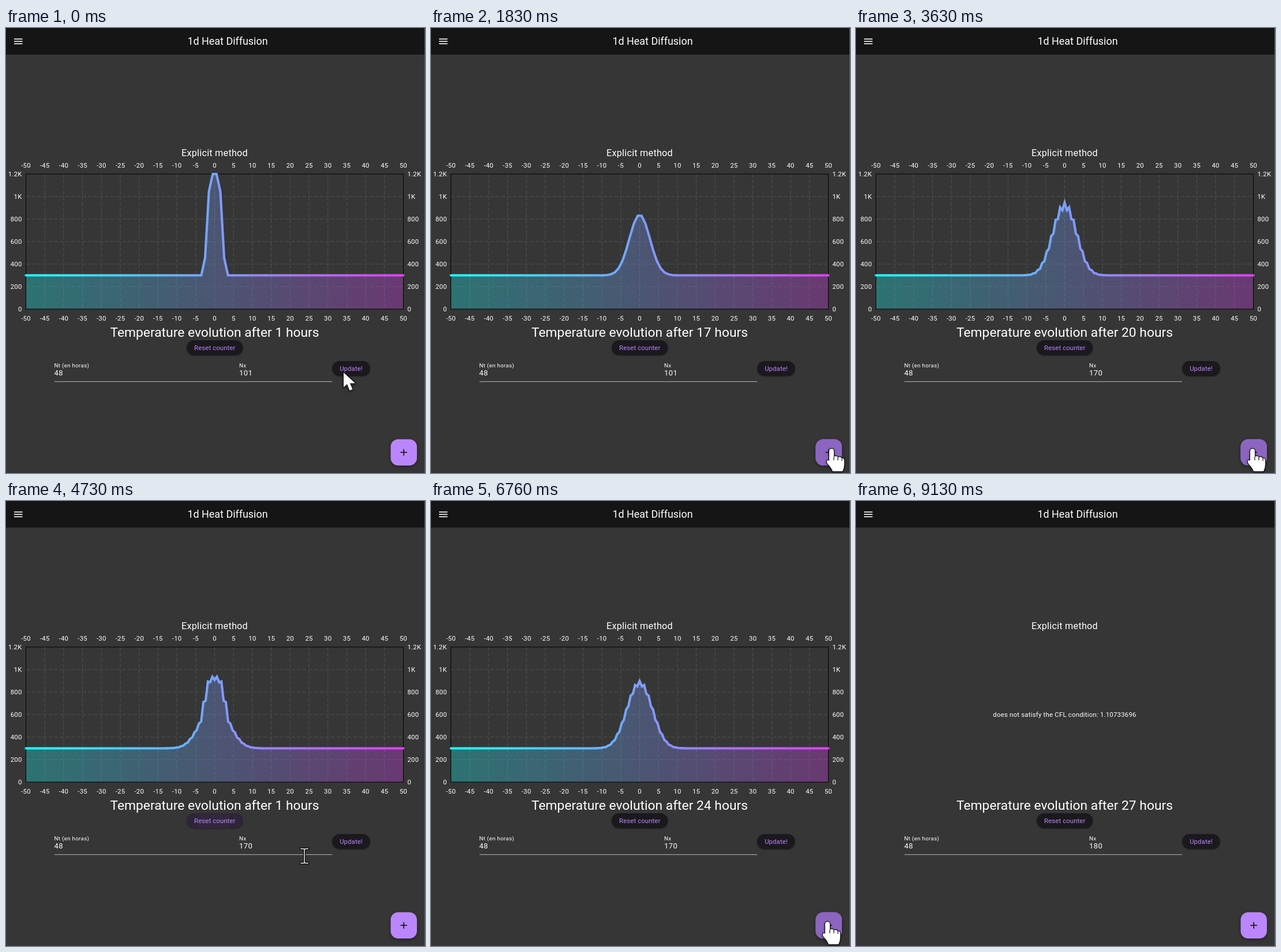
Animation, 726 px wide and 771 px high, one loop 9.46 s. Source, as an HTML page with a canvas:

```html
<!DOCTYPE html>
<html lang="en">
<head>
<meta charset="utf-8">
<title>1d Heat Diffusion</title>
<style>
  html, body { margin: 0; width: 100%; height: 100%; overflow: hidden; background: #363636; }
  canvas { display: block; }
</style>
</head>
<body>
<canvas id="stage" width="726" height="771"></canvas>
<script>
const ctx = document.getElementById('stage').getContext('2d');
const LOOP = 9460, CLICK_GAP = 77, CHART_ANIM = 75, FAIL_TIME = 8530;
const SCALE = 0.815; // page zoom, applied to font sizes
const PURPLE = '#bb86fc';
const plot = { left: 34.5, right: 688.5, top: 253, bottom: 487 };
const px = x => plot.left + (x + 50) * (plot.right - plot.left) / 100;
const py = v => plot.bottom - v * (plot.bottom - plot.top) / 1200;

// Explicit finite differences: hours -> list of [x, temperature]
const cache = {};
function solve(nx, hours) {
  const key = nx + ':' + hours;
  if (cache[key]) return cache[key];
  const count = nx - 1, lambda = 0.1728 * (count / 100) ** 2;
  if (!hours) {
    return cache[key] = Array.from({ length: count }, (_, i) => {
      const x = -50 + 100 * i / (count - 1);
      return [x, Math.abs(x) < 2.5 ? 1200 : 300];
    });
  }
  const u = solve(nx, hours - 1);
  return cache[key] = u.map(([x, v], i) =>
    [x, u[i - 1] && u[i + 1] ? v + lambda * (u[i - 1][1] - 2 * v + u[i + 1][1]) : v]);
}

// Counter states over time
const states = [{ time: -1000, hours: 1, nx: 101 }];
function addClicks(start, from, to, nx) {
  for (let h = from; h <= to; h++) states.push({ time: start + (h - from) * CLICK_GAP, hours: h, nx });
}
addClicks(623, 2, 20, 101);
addClicks(3280, 20, 20, 170);
addClicks(3905, 21, 29, 170);
addClicks(4713, 1, 1, 170);
addClicks(5001, 2, 27, 170);

const typed = [[0, '101'], [2500, '10'], [2530, '1'], [2730, '17'], [2760, '170'],
  [7430, '17'], [7500, '1'], [7630, '180']];

// Pointer path: time, x, y
const path = [[0, 585, 597], [360, 585, 597], [560, 694, 729], [2100, 694, 729],
  [2260, 478, 597], [3000, 478, 597], [3130, 592, 594], [3330, 592, 594],
  [3560, 687, 729], [4530, 687, 729], [4640, 362, 555], [4685, 362, 555],
  [4730, 517, 615], [4860, 687, 729], [6950, 687, 729], [7060, 470, 607],
  [7859, 470, 607], [7860, 617, 566], [8100, 592, 592], [8560, 592, 592], [9110, 500, 10]];

const resetBox = [313, 541, 97.5, 26], updateBox = [565, 577, 66, 26];
const fabBox = [666.5, 712.5, 45.5, 45.5], fieldBox = [84, 575, 481, 42];
const inside = (p, [x, y, w, h]) => p.x >= x && p.x <= x + w && p.y >= y && p.y <= y + h;
const lerp = (a, b, k) => a + (b - a) * k;
const between = (t, a, b) => t >= a && t < b;

function pointerAt(t) {
  const i = path.findIndex(p => p[0] > t);
  if (i < 0) return null;
  const [a, b] = [path[i - 1], path[i]];
  let k = (t - a[0]) / (b[0] - a[0]);
  k = k * k * (3 - 2 * k);
  const p = { x: lerp(a[1], b[1], k), y: lerp(a[2], b[2], k) };
  const onButton = [resetBox, updateBox, fabBox].some(box => inside(p, box));
  p.kind = onButton && t >= 30 ? 'hand' : inside(p, fieldBox) && t >= 30 ? 'beam' : 'arrow';
  return p;
}

function text(str, x, y, size, { align = 'center', color = '#fff', spacing = 0 } = {}) {
  ctx.font = `${size * SCALE}px Roboto, sans-serif`;
  ctx.letterSpacing = spacing * SCALE + 'px';
  ctx.textAlign = align;
  ctx.fillStyle = color;
  ctx.fillText(str, x, y);
}

function rect(color, x, y, w, h) {
  ctx.fillStyle = color;
  ctx.fillRect(x, y, w, h);
}

function rounded([x, y, w, h], radius, color, blur, offset) {
  ctx.save();
  ctx.shadowColor = 'rgba(0,0,0,.38)';
  ctx.shadowBlur = blur;
  ctx.shadowOffsetY = offset;
  ctx.beginPath();
  ctx.roundRect(x, y, w, h, radius);
  ctx.fillStyle = color;
  ctx.fill();
  ctx.restore();
}

function button(box, label, hovered, pressed) {
  rounded(box, 13, pressed ? '#2e2538' : hovered ? '#28222f' : '#1b191d', 2, 1);
  const [x, y, w, h] = box;
  if (pressed) rect('#33273f', x + 20, y + 1, w - 43, h - 2);
  text(label, x + w / 2, y + 17, 14, { color: PURPLE, spacing: 0.1 });
}

function drawAxes() {
  ctx.strokeStyle = '#4d5355';
  ctx.lineWidth = 1;
  ctx.setLineDash([8 * SCALE, 4 * SCALE]);
  ctx.beginPath();
  for (let x = -45; x < 50; x += 5) {
    ctx.moveTo(px(x), plot.top);
    ctx.lineTo(px(x), plot.bottom);
  }
  for (let v = 200; v < 1200; v += 200) {
    ctx.moveTo(plot.left, py(v));
    ctx.lineTo(plot.right, py(v));
  }
  ctx.stroke();
  ctx.setLineDash([]);

  const style = { spacing: 0.25 };
  for (let x = -50; x <= 50; x += 5) {
    text(x, px(x), 242, 14, style);
    text(x, px(x), 507, 14, style);
  }
  for (let v = 0; v <= 1200; v += 200) {
    const label = v < 1000 ? v : v / 1000 + 'K';
    text(label, 27.5, py(v) + 4, 14, { ...style, align: 'right' });
    text(label, 695.5, py(v) + 4, 14, { ...style, align: 'left' });
  }
}

function gradient(alpha) {
  const g = ctx.createLinearGradient(plot.left, 0, plot.right, 0);
  g.addColorStop(0, `rgba(24,255,255,${alpha})`);
  g.addColorStop(1, `rgba(224,64,251,${alpha})`);
  return g;
}

function drawCurve(t, state, previous) {
  const to = solve(state.nx, state.hours);
  const from = previous ? solve(previous.nx, previous.hours) : to;
  const k = Math.min(1, (t - state.time) / CHART_ANIM);
  const line = new Path2D();
  // Points pair up by index; surplus ones start in their final place
  to.forEach((p, i) => {
    const q = from[i] || p;
    line.lineTo(px(lerp(q[0], p[0], k)), py(lerp(q[1], p[1], k)));
  });
  const area = new Path2D(line);
  area.lineTo(plot.right, plot.bottom);
  area.lineTo(plot.left, plot.bottom);
  ctx.fillStyle = gradient(0.3);
  ctx.fill(area);

  ctx.strokeStyle = '#000';
  ctx.lineWidth = 1;
  ctx.strokeRect(plot.left, plot.top, plot.right - plot.left, plot.bottom - plot.top);

  ctx.strokeStyle = gradient(1);
  ctx.lineWidth = 5 * SCALE;
  ctx.lineCap = 'round';
  ctx.lineJoin = 'miter';
  ctx.miterLimit = 4;
  ctx.stroke(line);
  ctx.lineCap = 'butt';
}

function drawFields(t) {
  const focused = between(t, 2330, 3280) || between(t, 7200, FAIL_TIME);
  const label = { align: 'left', spacing: 0.375 };
  const value = { align: 'left', spacing: 0.5 };
  const nx = typed.filter(e => e[0] <= t).pop()[1];
  text('Nt (en horas)', 83.5, 588, 12, label);
  text('48', 83.5, 602, 16, value);
  text('Nx', 404, 588, 12, { ...label, color: focused ? PURPLE : '#fff' });
  text(nx, 404, 602, 16, value);
  const caretX = 404.5 + ctx.measureText(nx).width;
  rect('#a3a3a3', 84, 612, 481, 1.2);
  if (focused) {
    rect(PURPLE, 404, 611.6, 161, 1.7);
    if (t < 8330) rect(PURPLE, caretX, 587, 1.7, 19);
  }
}

function drawFab(t, state, hovered) {
  const [x, y, w] = fabBox, cx = x + w / 2, cy = y + w / 2;
  rounded(fabBox, 13, hovered ? '#9a71d2' : PURPLE, 6, 2);
  if (hovered && t - state.time < 500) {
    ctx.save();
    ctx.beginPath();
    ctx.roundRect(...fabBox, 13);
    ctx.clip();
    ctx.beginPath();
    ctx.arc(cx, cy, 13 + 20 * Math.min(1, (t - state.time) / 70), 0, 7);
    ctx.fillStyle = '#8c65c0';
    ctx.fill();
    ctx.restore();
  }
  rect('#111', cx - 5.7, cy - 0.8, 11.4, 1.6);
  rect('#111', cx - 0.8, cy - 5.7, 1.6, 11.4);
}

const shapes = {
  arrow: new Path2D('M0 0V25.5L6 20L10.5 31L15.5 29L11 18.5H20Z'),
  hand: new Path2D('M-4 4a4 4 0 0 1 8 0v10q5-3 7 1q5-2 7 2q4-1 4 4v6q0 6-3 12h-17q-2-6-8-12q-4-5-1-7q3-1 3 2z'),
  beam: new Path2D('M-6-12.5H-2Q0-12.5 0-10.5Q0-12.5 2-12.5H6M0-11V11M-6 12.5H-2Q0 12.5 0 10.5Q0 12.5 2 12.5H6')
};

function drawPointer({ x, y, kind }) {
  const shape = shapes[kind];
  ctx.save();
  ctx.translate(x, y);
  ctx.lineJoin = 'round';
  ctx.strokeStyle = '#111';
  if (kind === 'beam') {
    ctx.lineCap = 'square';
    ctx.lineWidth = 4.5;
    ctx.stroke(shape);
    ctx.strokeStyle = '#eee';
    ctx.lineWidth = 1.5;
    ctx.stroke(shape);
  } else {
    ctx.shadowColor = 'rgba(0,0,0,.4)';
    ctx.shadowBlur = 4;
    ctx.shadowOffsetY = 2;
    ctx.lineWidth = 2.4;
    ctx.stroke(shape);
    ctx.shadowColor = 'transparent';
    ctx.fillStyle = '#fff';
    ctx.fill(shape);
    if (kind === 'hand') {
      ctx.lineWidth = 1.2;
      ctx.stroke(new Path2D('M4 14v6M11 15v5M18 17v4'));
    }
  }
  ctx.restore();
}

function draw(t) {
  const index = states.findLastIndex(s => s.time <= t), state = states[index];
  const pointer = pointerAt(t);
  const over = box => !!pointer && pointer.kind === 'hand' && inside(pointer, box);

  rect('#363636', 0, 0, 726, 771);
  rect('#151515', 0, 0, 726, 46);
  rect('#5a5a5a', 725, 0, 1, 771);
  for (const y of [18.3, 22.4, 26.5]) rect('#fff', 14, y, 14.6, 1.6);
  text('1d Heat Diffusion', 384, 29, 22);
  text('Explicit method', 361.5, 221.5, 20, { spacing: 0.25 });

  if (t < FAIL_TIME) {
    drawAxes();
    drawCurve(t, state, states[index - 1]);
  } else {
    text('does not satisfy the CFL condition: 1.10733696', 361.5, 374, 14, { spacing: 0.25 });
  }

  text(`Temperature evolution after ${state.hours} hours`, 361.5, 535, 28);
  button(resetBox, 'Reset counter', over(resetBox), between(t, 4640, 4840));
  drawFields(t);
  button(updateBox, 'Update!', over(updateBox), between(t, 3250, 3340) || between(t, 8500, 8600));
  drawFab(t, state, over(fabBox));
  if (pointer) drawPointer(pointer);
}

function frame() {
  draw(performance.now() % LOOP);
  requestAnimationFrame(frame);
}
frame();
</script>
</body>
</html>
```
